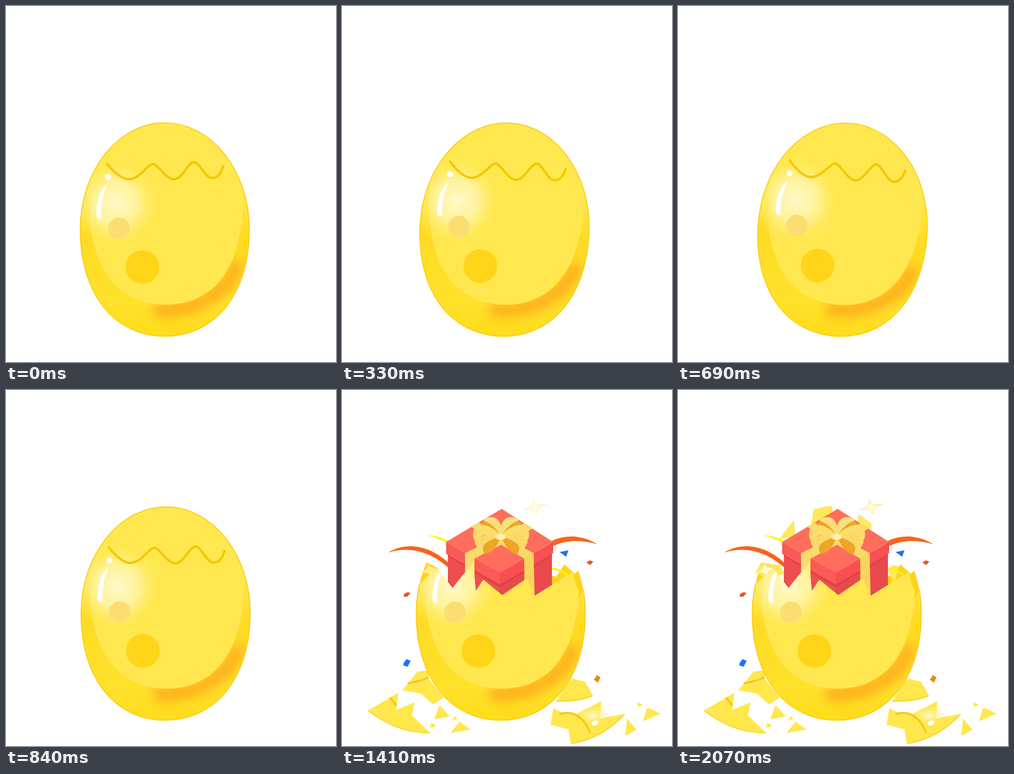
These frames come from a looping animation (558 px wide and 602 px high, 2100 ms). An HTML page:

```html
<!DOCTYPE html>
<html lang="en">
<head>
<meta charset="utf-8">
<title>Gift egg</title>
<style>
html, body { margin: 0; width: 100%; height: 100%; overflow: hidden; background: #fff; }
svg { display: block; width: 558px; height: 602px; }
</style>
</head>
<body>
<svg viewBox="0 0 558 602">
  <defs>
    <path id="outline" d="M268.5 197.5C346 197.5 411.5 277 411.5 378C411.5 488 353 558.5 268.5 558.5C184 558.5 125.5 488 125.5 378C125.5 277 191 197.5 268.5 197.5Z"/>
    <clipPath id="eggClip"><use href="#outline"/></clipPath>
    <clipPath id="frontClip">
      <path d="M100 345L133 326L161 302L187 335L222 291L226 340L239 321L271 347L312 319L326 348L390 308L401 354L412 328V602H100Z"/>
    </clipPath>
    <linearGradient id="body" x2="0" y2="1">
      <stop offset=".35" stop-color="#ffe64a"/>
      <stop offset=".55" stop-color="#ffda24"/>
      <stop offset=".85" stop-color="#ffe22c"/>
      <stop offset="1" stop-color="#ffdb1a"/>
    </linearGradient>
    <radialGradient id="glow">
      <stop stop-color="#fffbd8" stop-opacity=".9"/>
      <stop offset=".5" stop-color="#fff7b8" stop-opacity=".7"/>
      <stop offset="1" stop-color="#ffe84f" stop-opacity="0"/>
    </radialGradient>
    <radialGradient id="shine">
      <stop stop-color="#fffbe0"/>
      <stop offset="1" stop-color="#ffe94f" stop-opacity="0"/>
    </radialGradient>
    <filter id="soft" x="-30%" y="-50%" width="160%" height="200%"><feGaussianBlur stdDeviation="10"/></filter>
    <g id="egg">
      <g clip-path="url(#eggClip)">
        <use href="#outline" fill="url(#body)"/>
        <path d="M258 513C312 517 372 490 390 440" fill="none" stroke="#ffa018" stroke-width="22" stroke-linecap="round" stroke-opacity=".85" filter="url(#soft)"/>
        <path d="M140 190V330C140 440 187 505 270 505C353 505 400 440 400 330V190Z" fill="#ffe84f"/>
        <circle cx="186" cy="333" r="75" fill="url(#glow)"/>
        <circle cx="191" cy="376" r="18" fill="#fbdd72"/>
        <circle cx="230.500" cy="441.500" r="28.500" fill="#ffd419"/>
      </g>
      <use href="#outline" fill="none" stroke="#f8ce10" stroke-width="1.6"/>
      <path d="M170 302C159 309 150 340 154 357Q158 364 162 358C160 338 163 322 170 305Z" fill="#fff"/>
    </g>
  </defs>

  <g id="broken">
    <g id="pieces" fill="#ffe74c"></g>
    <g clip-path="url(#eggClip)">
      <path d="M143 291L163 302L138 330H124L128 315Z" fill="#ffd31b"/>
      <path d="M320 346L330 330L346 310L362 316L376 295L394 311L402 302L414 345L401 360Z" fill="#ffd31b"/>
    </g>
    <path id="rays" fill="#ffe85c" d="M172 252L180 240L196 220L198 248ZM225 230L229 202L248 197L261 196L262 226ZM302 226L306 210L327 226V236ZM132 307L140 292L172 296L180 310L150 322ZM354 305L362 296L374 298L366 325Z"/>
    <g id="party">
      <path d="M78 275C106 257 148 260 184 296L186 306C150 271 112 264 78 275Z" fill="#fa641c"/>
      <path d="M432 261C405 244 374 244 350 258L350 267C380 252 404 253 432 261Z" fill="#fa641c"/>
      <path d="M143 246C160 246 174 250 187 260L184 264C171 254 159 249 143 246Z" fill="#fff21c"/>
      <path d="M354 302C376 303 393 320 400 344" fill="none" stroke="#fff21c" stroke-width="3.500"/>
      <path d="M368 274L383 271L379 282Z" fill="#1b76ef"/>
      <path d="M104 346L110 342L116 343L111 349L105 350Z" fill="#ed5320"/>
      <path d="M413 292L419 288L425 290L420 296Z" fill="#ed5320"/>
      <path d="M104 462L109 455L116 458L111 468L104 466Z" fill="#1b76ef"/>
      <path d="M426 490L431 482L437 486L433 495Z" fill="#e08a1d"/>
      <g id="topStar"></g>
    </g>
    <g id="gift">
      <path d="M179 275L267 324V400L179 348Z" fill="#ef4d50"/>
      <path d="M355 273V345L267 400V324Z" fill="#e94a4d"/>
      <path d="M179 277L267 328L355 275V280L267 334L179 281Z" fill="#dd4444"/>
      <path d="M176 257L267 308V329L176 277Z" fill="#fb5b55"/>
      <path d="M357 257V276L267 329V308Z" fill="#f85052"/>
      <path d="M270 201L357 257L267 308L176 257Z" fill="#ff6d5c"/>
      <path d="M218 231L231 224L324 276L308 285ZM309 225L323 234L224 285L208 276Z" fill="#fbd968"/>
      <path d="M208 275L224 284V370L208 360Z" fill="#fbdc70"/>
      <path d="M308 284L324 275L326 360L309 370Z" fill="#f8d45e"/>
      <g id="bow"></g>
    </g>
    <g id="lowStar"></g>
    <g clip-path="url(#frontClip)"><use href="#egg"/></g>
  </g>

  <g id="whole">
    <use href="#egg"/>
    <circle cx="172.500" cy="289" r="5" fill="#fff"/>
    <path d="M171 267C185 284 197 293 208 293C226 293 240 267 248 267C257 267 270 293 284 293C298 293 308 264 318 264C327 264 337 291 349 291C358 291 364 282 367 271" fill="none" stroke="#f4c800" stroke-width="4" stroke-linecap="round"/>
  </g>
</svg>
<script>
const $ = id => document.getElementById(id);
const LOOP = 2100, STEP = 30, BREAK = 866;
const shape = (d, extra = '') => `<path d="${d}" ${extra}/>`;
const line = d => shape(d, 'fill="none" stroke="#f3c91d" stroke-width="3.5"');

$('pieces').innerHTML = [
  'M128 476L146 474L147 489L172 520L154 532L133 513L102 508Z',
  'M388 488L411 493L424 517Q398 528 362 526Z',
  'M165 533L182 552L156 557Z',
  'M152 562L159 569L148 571Z',
  'M191 551L195 557L186 559Z',
  'M199 561L217 574L183 580Z',
  'M516 537L539 547L509 560Z',
  'M499 528L509 532L501 536Z',
  'M482 556L498 574L479 585Z',
  'M44 542L95 512L92 541L123 528L118 550L149 580Q92 580 44 542Z',
  'M357 538L378 548L395 549L438 526L437 555L478 548Q440 590 387 598L383 574L353 566Z'
].map(d => shape(d)).join('')
  + '<ellipse cx="424" cy="550" rx="30" ry="18" fill="url(#shine)"/>'
  + line('M111 496Q130 493 147 486') + line('M81 520L92 533')
  + line('M368 548Q402 538 420 580')
  + shape('M44 542Q92 580 149 580M478 548Q440 590 387 598M424 517Q398 528 362 526', 'fill="none" stroke="#f3cf20" stroke-width="1.5"')
  + '<ellipse cx="428" cy="563" rx="6" ry="4" transform="rotate(-20 428 563)" fill="#fff"/>';

// Right half of the bow, mirrored for the left.
const halfBow =
  shape('M268 248C275 226 292 215 304 226Q296 240 268 248Z', 'fill="#eda526"')
  + shape('M268 248C266 230 272 216 284 215Q295 214 299 221C285 225 277 235 268 248Z', 'fill="#fbe07a"')
  + shape('M268 248C282 229 307 222 315 235Q319 250 311 257C303 240 286 246 268 248Z', 'fill="#fcdc6c"')
  + shape('M270 250C291 249 306 262 297 277Q282 278 270 250Z', 'fill="#eda526"')
  + shape('M268 248C288 243 308 245 314 256Q311 268 303 271C297 256 283 251 268 248Z', 'fill="#fbd968"');
$('bow').innerHTML = halfBow
  + `<g transform="translate(538 0) scale(-1 1)">${halfBow}</g>`
  + '<ellipse cx="268" cy="248" rx="9" ry="5.500" fill="#fff0a0"/>';

const star = (x, y) => shape('M-20 0Q-2-.5 0-12Q2-.5 20 0Q2 .5 0 12Q-2 .5-20 0Z',
  `transform="translate(${x} ${y}) rotate(-14)" fill="#fffbe0" stroke="#ffe95c"`);
$('topStar').innerHTML = star(326, 198);
$('lowStar').innerHTML = star(148, 305);

// Linear interpolation over [time, value] pairs.
function track(t, keys) {
  const i = keys.findIndex(k => k[0] > t);
  if (i < 0) return keys[keys.length - 1][1];
  if (i === 0) return keys[0][1];
  const [t0, a] = keys[i - 1], [t1, b] = keys[i];
  return a + (b - a) * (t - t0) / (t1 - t0);
}

const zoom = (x, y, s, turn = 0) =>
  `translate(${x} ${y}) rotate(${turn}) scale(${s}) translate(${-x} ${-y})`;

function draw(t) {
  const open = t >= BREAK;
  $('whole').style.display = open ? 'none' : '';
  $('broken').style.display = open ? '' : 'none';
  const tilt = track(t, [[0, 0], [98, -4], [295, 4], [492, -4], [690, 4], [BREAK, 0]]);
  $('whole').setAttribute('transform', `rotate(${tilt} 268.5 519)`);

  const size = track(t, [[BREAK, 0], [1020, .73], [1110, 1.1], [1200, 1]]);
  const turn = track(t, [[BREAK, -180], [1020, -54], [1095, 0]]);
  $('gift').setAttribute('transform', zoom(268, 299, size, turn));
  const spread = track(t, [[BREAK, 0], [1020, .672], [1110, 1.1], [1200, 1]]);
  $('party').setAttribute('transform', zoom(267, 355, spread));

  const twinkle = track(t, [[1020, .4], [1410, .6], [1650, .6], [1860, 1]]);
  $('topStar').setAttribute('opacity', twinkle);
  $('lowStar').setAttribute('opacity', t < 1080 ? 0 : twinkle);
  $('rays').setAttribute('opacity', track(t, [[1830, 0], [2010, 1]]));
}

let start;
function tick(now) {
  start ??= now;
  draw(Math.floor((now - start) % LOOP / STEP) * STEP);
  requestAnimationFrame(tick);
}
draw(0);
requestAnimationFrame(tick);
</script>
</body>
</html>
```
